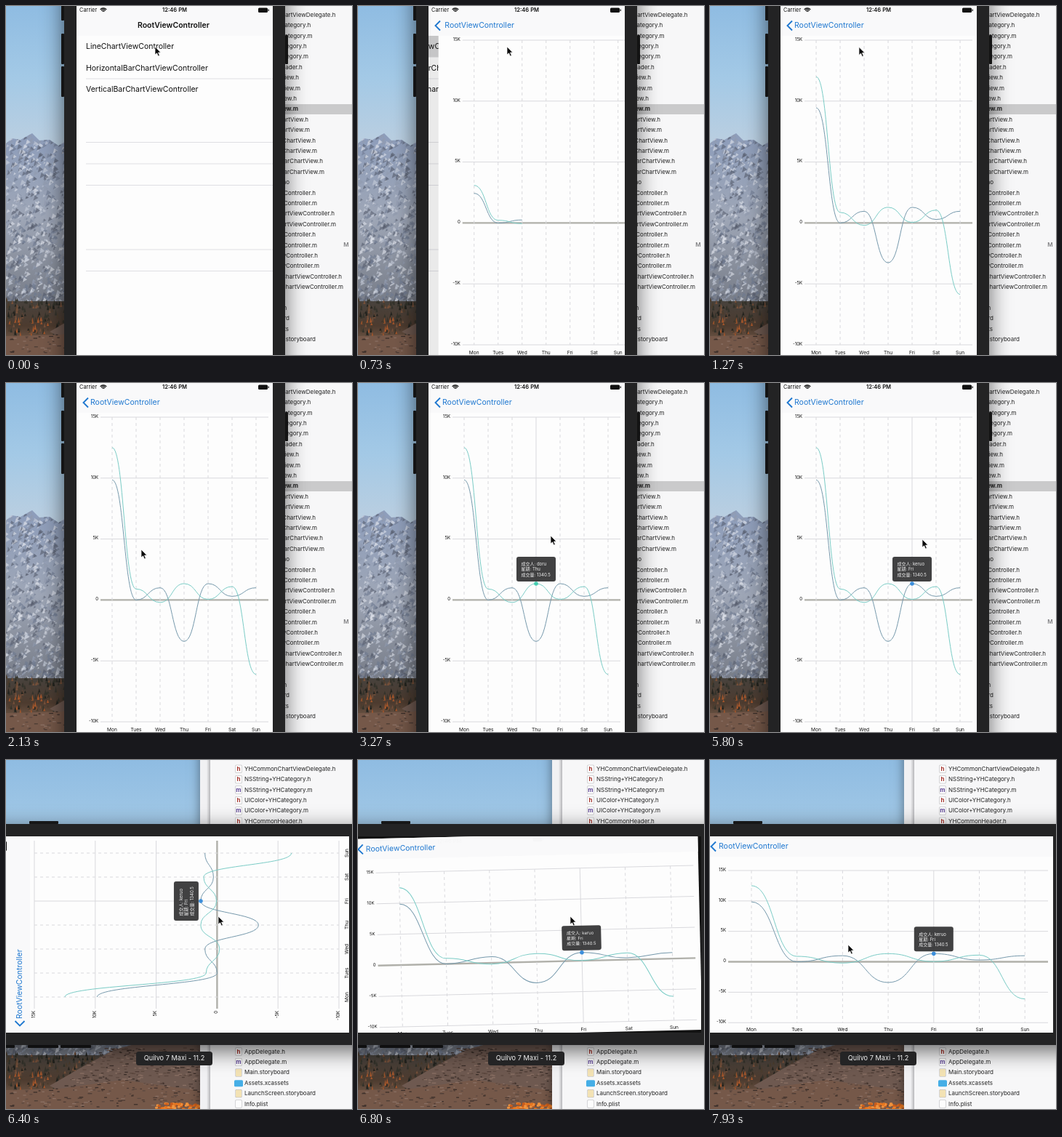
Animation of 476x480 px, one loop 8000 ms. Source, as an HTML page with a canvas:

```html
<!DOCTYPE html>
<html lang="en">
<head>
<meta charset="utf-8">
<title>Chart demo</title>
<style>
html, body { margin: 0; width: 100%; height: 100%; overflow: hidden; background: #f7f7f8; }
canvas { display: block; width: 476px; height: 480px; }
</style>
</head>
<body>
<canvas id="stage"></canvas>
<script>
const W = 476, H = 480, LOOP = 8000, SCALE = window.devicePixelRatio || 1;
const SANS = 'Inter, "Noto Sans CJK SC", "Noto Sans CJK", sans-serif';
const GRID = '#d9d9dd', BLUE = '#1f78d0', BODY = '#232324';
const DAYS = ['Mon', 'Tues', 'Wed', 'Thu', 'Fri', 'Sat', 'Sun'];
const SERIES = [
  { color: '#7699ac', dot: '#3d8fdc', data: [9.85, 0, 1, -3.4, 1.34, 0.3, 1] },
  { color: '#7accc6', dot: '#45cdb0', data: [12.5, 0.9, -0.2, 1.34, 0.05, 1.1, -6.1] }
];
const PORTRAIT = { w: 270, h: 480, left: 33, right: 264, x0: 49, dx: 33, top: 47, step: 83.8, labelY: 477, navY: 27, navH: 41, titleX: 19 };
const LANDSCAPE = { w: 480, h: 270, left: 33, right: 473, x0: 65, dx: 62.7, top: 47, step: 41.85, labelY: 266, navY: 14, navH: 28, titleX: 20 };
const CURSOR = [
  [0, 205, 56], [1250, 205, 56], [1950, 186, 229], [2250, 186, 229], [2700, 245, 276], [2850, 245, 276],
  [3230, 265, 210], [3550, 265, 210], [3950, 278, 276], [4100, 278, 276], [4500, 292, 215],
  [7050, 292, 215], [7700, 190, 254], [LOOP, 190, 254]
];

const clamp = v => Math.max(0, Math.min(1, v));
const mix = (a, b, k) => a + (b - a) * k;
const smooth = (t, from, to) => { const k = clamp((t - from) / (to - from)); return k * k * (3 - 2 * k); };
const mixLayout = (a, b, k) => Object.fromEntries(Object.keys(a).map(key => [key, mix(a[key], b[key], k)]));

function makeCanvas(canvas) {
  canvas.width = W * SCALE;
  canvas.height = H * SCALE;
  const c = canvas.getContext('2d');
  c.scale(SCALE, SCALE);
  c.textBaseline = 'middle';
  return c;
}
function box(c, x, y, w, h, color, radius = 0) {
  c.fillStyle = color;
  c.beginPath();
  c.roundRect(x, y, w, h, radius);
  c.fill();
}
function text(c, str, x, y, size, color = '#111', align = 'left', weight = 400) {
  c.font = `${weight} ${size}px ${SANS}`;
  c.textAlign = align;
  c.fillStyle = color;
  c.fillText(str, x, y);
}
function line(c, x1, y1, x2, y2, color, width = 1, dash = []) {
  c.strokeStyle = color;
  c.lineWidth = width;
  c.setLineDash(dash);
  c.beginPath();
  c.moveTo(x1, y1);
  c.lineTo(x2, y2);
  c.stroke();
  c.setLineDash([]);
}
function polygon(c, points, color) {
  c.fillStyle = color;
  c.beginPath();
  points.forEach(([x, y]) => c.lineTo(x, y));
  c.closePath();
  c.fill();
}
function gradient(c, x1, y1, x2, y2, ...colors) {
  const g = c.createLinearGradient(x1, y1, x2, y2);
  colors.forEach((color, i) => g.addColorStop(i / (colors.length - 1), color));
  return g;
}

function drawDesktop(c) {
  let seed = 7;
  const rnd = () => (seed = (seed * 16807) % 2147483647) / 2147483647;
  const pick = list => list[Math.floor(rnd() * list.length)];
  box(c, 0, 0, 268, 210, gradient(c, 0, 0, 0, 195, '#8fbce2', '#a3c9e6', '#bccfe0'));
  c.save();
  c.beginPath();
  [[0, 189], [8, 182], [20, 184], [36, 175], [46, 185], [60, 184], [72, 192], [110, 170], [180, 200], [268, 185], [268, 420], [0, 420]]
    .forEach(([x, y]) => c.lineTo(x, y));
  c.clip();
  box(c, 0, 170, 268, 250, gradient(c, 0, 175, 0, 410, '#8d9dbb', '#9ea6b6', '#767b86'));
  c.globalAlpha = 0.6;
  for (let i = 0; i < 2600; i++) {
    const x = rnd() * 268, y = 175 + rnd() * 232, s = 2 + rnd() * 4;
    polygon(c, [[x, y], [x + s * 0.9, y + s * 0.7], [x - s * 0.4, y + s * 1.4]], pick(['#dfe3ec', '#c6cddb', '#6f7a92', '#575e6e', '#929cb0']));
  }
  c.restore();
  box(c, 0, 406, 268, 74, gradient(c, 0, 400, 0, 480, '#46433f', '#4d3b2f', '#8c6f5c'));
  for (let i = 0; i < 420; i++) {
    const x = rnd() * 268, y = 400 + rnd() * 48, s = 3 + rnd() * 6;
    polygon(c, [[x, y], [x + 1.6, y + s], [x - 1.6, y + s]], pick(['#24241f', '#34332b', '#4b3d2e', y > 425 ? '#a4562b' : '#34332b', '#75503a']));
  }
  polygon(c, [[60, 448], [105, 422], [150, 398], [180, 390], [268, 390], [268, 480], [120, 480]], '#6e5950');
  polygon(c, [[75, 452], [160, 440], [268, 455], [268, 480], [0, 480], [0, 454]], '#755849');
  for (let i = 0; i < 420; i++) {
    const y = 395 + rnd() * 82, x = 268 - rnd() * (y > 450 ? 268 : 268 - 105 + (y - 422));
    box(c, x, y, 2 + rnd() * 4, 1.3, pick(['#4c3b34', '#8a7064', '#5c483f', '#3a2e29']));
  }
  for (let i = 0; i < 70; i++) box(c, 205 + rnd() * 60, 471 + rnd() * 9, 4, 3, pick(['#e8761f', '#c85c1c', '#ee9440']), 1);
}

function drawSidebar(c) {
  c.save();
  c.shadowColor = 'rgba(0,0,0,.45)';
  c.shadowBlur = 14 * SCALE;
  box(c, 267, -20, 260, 520, '#f1f1f3');
  c.restore();
  box(c, 276, 0, 5, H, gradient(c, 276, 0, 281, 0, 'rgba(110,110,115,0)', 'rgba(110,110,115,.45)'));
  box(c, 281, 0, 195, H, '#f7f7f8');
  box(c, 281, 135, 195, 14, '#cacacb');

  const pair = (name, right) => [[name + '.h', right], [name + '.m', right + 2]];
  const rows = [
    ['YHCommonChartViewDelegate.h'], ['NSString+YHCategory.h'], ['NSString+YHCategory.m'],
    ['UIColor+YHCategory.h'], ['UIColor+YHCategory.m'], ['YHCommonHeader.h'],
    ...pair('YHCommonView', 403), ...pair('YHChartView', 400), ...pair('YHLineChartView', 416),
    ...pair('YHBaseChartView', 426), ...pair('YHBarChartView', 436), ['YHChartDemo', 390],
    ...pair('BaseController', 426), ...pair('LineChartViewController', 452),
    ...pair('RootController', 426), ...pair('BarViewController', 429), ...pair('BarChartViewController', 462),
    ['AppDelegate.h'], ['AppDelegate.m'], ['Main.storyboard'], ['Assets.xcassets'],
    ['LaunchScreen.storyboard'], ['Info.plist']
  ];
  rows.forEach(([name, right], i) => {
    const y = 12.3 + 14.4 * i;
    if (name.endsWith('xcassets')) {
      box(c, 314, y - 4, 12, 9, '#45aee6', 1.5);
    } else {
      box(c, 315.5, y - 5.5, 9, 11, '#b4b4b6', 1);
      box(c, 316, y - 5, 8, 10, name.endsWith('storyboard') ? '#f3e2b4' : '#fdfdfd', 1);
      const kind = name.slice(-2);
      if (kind === '.h' || kind === '.m') text(c, kind[1], 320, y, 8, kind === '.h' ? '#a5332c' : '#5e4596', 'center', 700);
    }
    text(c, name, right || 328, y, 8, '#222', right ? 'right' : 'left', i === 9 ? 700 : 400);
  });
  text(c, 'M', 468, 329, 8, '#808083', 'center', 600);
}

// Each segment leaves and reaches its points horizontally.
function drawCurve(c, L, series, phase) {
  const x = i => L.x0 + L.dx * i;
  const y = i => L.top + (15 - series.data[i] * phase) * L.step / 5;
  c.strokeStyle = series.color;
  c.lineWidth = 1;
  c.beginPath();
  c.moveTo(x(0), y(0));
  for (let i = 1; i <= Math.ceil(phase * 6 - 1e-6); i++) {
    c.bezierCurveTo(x(i - 0.5), y(i - 1), x(i - 0.5), y(i), x(i), y(i));
  }
  c.stroke();
}

function drawTip(c, x, y, name, day, dot) {
  c.fillStyle = dot;
  c.beginPath();
  c.arc(x, y, 2.8, 0, 7);
  c.fill();
  box(c, x - 27, y - 37, 54, 34, 'rgba(54,54,55,.94)', 3);
  ['成交人: ' + name, '星期: ' + day, '成交量: 1340.5'].forEach((row, i) =>
    text(c, row, x - 20.5, y - 26.5 + 7.2 * i, 6, '#f2f2f2'));
}

function drawChart(c, L, t) {
  box(c, 0, 0, L.w, L.h, '#fdfdfd');
  const phase = 0.5 - 0.5 * Math.cos(Math.PI * clamp((t - 400) / 1000));
  const chosen = t < 2800 ? -1 : t < 4050 ? 3 : 4;
  const bottom = L.top + L.step * 5;
  for (let i = 0; i < 6; i++) {
    const y = L.top + L.step * i, value = 15 - 5 * i;
    line(c, L.left, y, L.right, y, value ? GRID : '#b0b0aa', value ? 1 : 2.4);
    text(c, value ? value + 'K' : '0', L.left - 3, y - 1, 6, '#111', 'right');
  }
  DAYS.forEach((day, i) => {
    const x = L.x0 + L.dx * i;
    line(c, x, L.top, x, bottom, GRID, 1, i === chosen ? [] : [4, 4]);
    text(c, day, x, L.labelY, 6.6, '#111', 'center');
  });
  SERIES.forEach(s => drawCurve(c, L, s, phase));
  if (chosen > 0) {
    const y = L.top + (15 - 1.34) * L.step / 5;
    drawTip(c, L.x0 + L.dx * chosen, y, chosen === 3 ? 'doru' : 'keruo', DAYS[chosen], SERIES[chosen === 3 ? 1 : 0].dot);
  }
}

function drawList(c, t) {
  box(c, 0, 0, 270, 480, '#fdfdfd');
  if (t > 200) box(c, 0, 41, 270, 29.4, '#d6d6d7');
  [100, 187.5, 217, 246.5, 335, 364.5].forEach(y => line(c, 13, y, 270, y, '#dcdce0', 0.9));
  ['LineChartViewController', 'HorizontalBarChartViewController', 'VerticalBarChartViewController']
    .forEach((name, i) => text(c, name, 13, 56 + 29.4 * i, 10.5));
}

function drawStatus(c) {
  text(c, 'Carrier', 4, 6, 7.4);
  c.strokeStyle = '#111';
  c.lineWidth = 1.3;
  [2, 4, 6].forEach(r => {
    c.beginPath();
    c.arc(37, 9, r, -Math.PI * 0.76, -Math.PI * 0.24);
    c.stroke();
  });
  text(c, '12:46 PM', 135, 6, 7.6, '#111', 'center', 600);
  box(c, 250, 2.5, 13, 6.5, '#111', 1.5);
  box(c, 263.6, 4.5, 1.2, 2.6, '#111');
}

function drawNav(c, L, push, turn) {
  box(c, 0, 0, L.w, L.navH, '#f9f9fa');
  c.globalAlpha = 1 - turn;
  if (turn < 1) drawStatus(c);
  const x = mix(84, L.titleX, push);
  c.globalAlpha = clamp(1 - push * 1.5);
  text(c, 'RootViewController', x, L.navY, 10.5, '#111', 'left', 600);
  c.globalAlpha = clamp(push * 1.5 - 0.4);
  text(c, 'RootViewController', x, L.navY, 10.5, BLUE);
  c.strokeStyle = BLUE;
  c.lineWidth = 1.9;
  c.beginPath();
  c.moveTo(16, L.navY - 6.5);
  c.lineTo(9.5, L.navY);
  c.lineTo(16, L.navY + 6.5);
  c.stroke();
  c.globalAlpha = 1;
}

function drawScreen(c, t) {
  const turn = smooth(t, 6430, 6830);
  const L = mixLayout(PORTRAIT, LANDSCAPE, turn);
  const s = Math.max(0, t - 350) / 1000 * 12.4;
  const push = t > 1300 ? 1 : 1 - (1 + s) * Math.exp(-s);
  c.save();
  c.beginPath();
  c.rect(-135, -240, 270, 480);
  c.clip();
  box(c, -135, -240, 270, 480, '#111');
  c.rotate(turn * Math.PI / 2);
  c.translate(-L.w / 2, -L.h / 2);
  if (push < 1) {
    c.save();
    c.translate(-81 * push, 0);
    drawList(c, t);
    c.restore();
    box(c, 0, 41, 270, 439, `rgba(0,0,0,${0.08 * push})`);
  }
  if (push > 0) {
    c.save();
    c.translate(270 * (1 - push), 0);
    drawChart(c, L, t);
    c.restore();
  }
  drawNav(c, L, push, turn);
  c.restore();
}

function drawPhone(c, t) {
  const spin = smooth(t, 6110, 6390);
  c.save();
  c.translate(232, 240);
  c.rotate(-spin * Math.PI / 2);
  [[-156, -260, 40], [-156, -202, 42], [-156, -157, 42], [152, -200, 40]].forEach(([x, y, h]) => box(c, x, y, 4, h, '#1b1b1c', 1));
  c.shadowColor = 'rgba(0,0,0,.6)';
  c.shadowBlur = 30 * SCALE;
  c.shadowOffsetY = 8 * SCALE;
  box(c, -152, -308, 304, 616, BODY, 40);
  c.shadowColor = 'transparent';
  drawScreen(c, t);
  c.restore();
  const y = mix(567, 410.5, spin);
  box(c, 179, y - 9.5, 105, 19, '#242425', 3.5);
  text(c, 'Quilvo 7 Maxi - 11.2', 231.5, y, 9.2, '#f2f2f2', 'center');
}

function drawCursor(c, t) {
  const i = CURSOR.findIndex(k => k[0] > t);
  const [t0, x0, y0] = CURSOR[i - 1], [t1, x1, y1] = CURSOR[i];
  const k = smooth(t, t0, t1);
  c.save();
  c.translate(mix(x0, x1, k), mix(y0, y1, k));
  c.lineJoin = 'round';
  polygon(c, [[0, 0], [0, 11], [2.6, 8.8], [4.4, 13], [6.3, 12.2], [4.5, 8.1], [7.8, 7.9]], '#0a0a0a');
  c.strokeStyle = '#fff';
  c.lineWidth = 0.7;
  c.stroke();
  c.restore();
}

const stage = document.getElementById('stage');
const ctx = makeCanvas(stage);
const backdrop = document.createElement('canvas');
const back = makeCanvas(backdrop);
drawDesktop(back);
drawSidebar(back);

const start = performance.now();
function frame() {
  const t = (performance.now() - start) % LOOP;
  ctx.drawImage(backdrop, 0, 0, W, H);
  drawPhone(ctx, t);
  drawCursor(ctx, t);
  requestAnimationFrame(frame);
}
frame();
</script>
</body>
</html>
```
